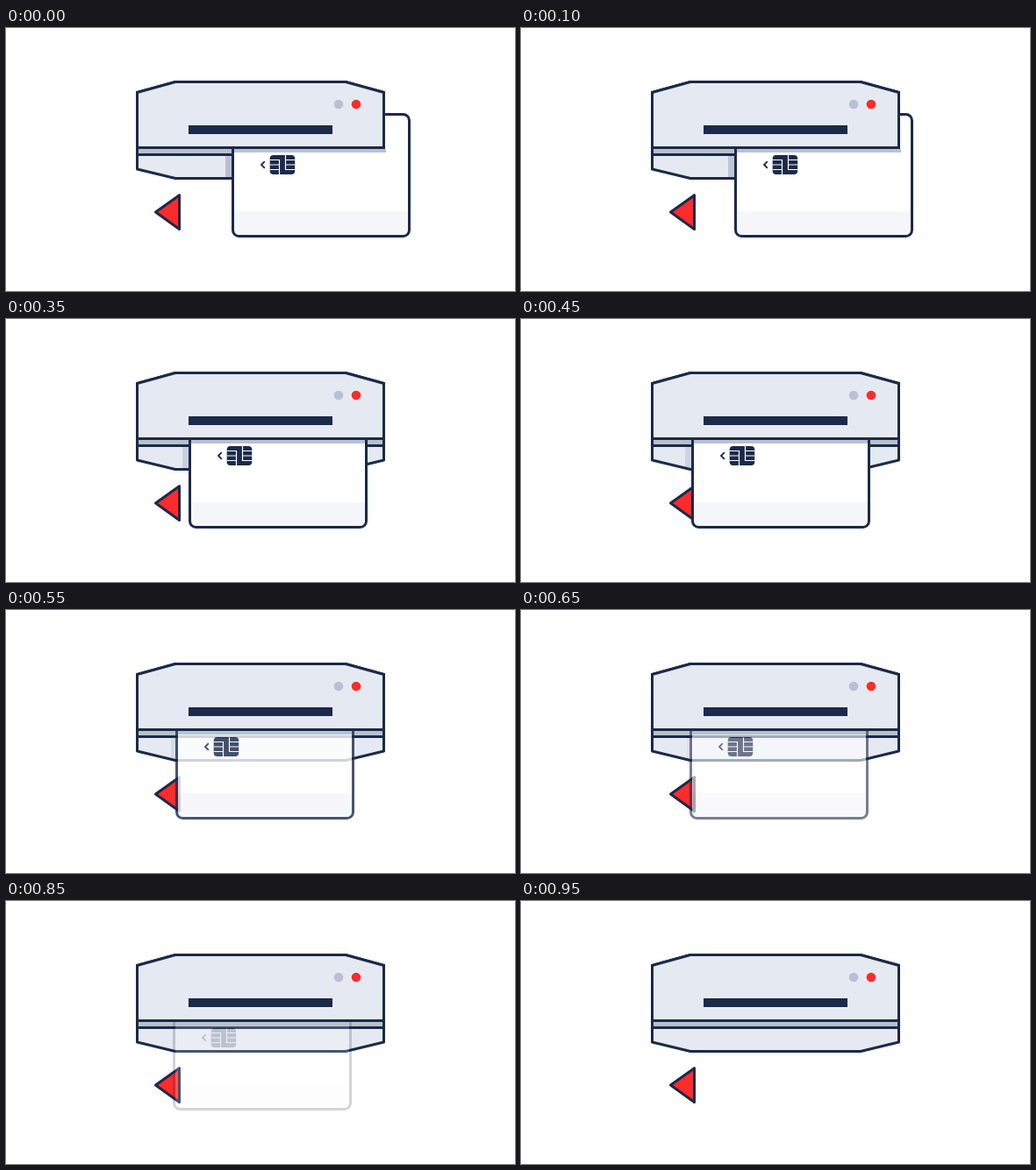
Animation of 580x300 px, one loop 1 s. Source, as an HTML page:

```html
<!DOCTYPE html>
<html lang="en">
<head>
<meta charset="utf-8">
<title>Card reader</title>
<style>
  html, body { margin: 0; width: 100%; height: 100%; overflow: hidden; background: #fff; }
  svg { display: block; width: 580px; height: 300px; }
  .line { stroke: #1b2a49; stroke-width: 3; stroke-linejoin: round; }
  .body { fill: #e5e9f2; }
  .none { fill: none; }
  .navy { fill: #1b2a49; }
  .red { fill: #fd2b2c; }
  .shade { fill: #b9c0d3; }
</style>
</head>
<body>
<svg viewBox="0 0 580 300">
  <defs>
    <path id="shell" d="M149.5 73.5 193 61.5H387L430.5 73.5V161L387 171.5H193L149.5 161Z"/>
    <clipPath id="inShell"><use href="#shell"/></clipPath>
    <clipPath id="underSlot"><rect x="148" y="138" width="285" height="4"/></clipPath>
  </defs>

  <!-- lower housing -->
  <use href="#shell" class="body"/>
  <g clip-path="url(#inShell)">
    <rect id="side" class="shade" x="-7" y="146" width="7" height="26"/>
  </g>
  <rect x="149.5" y="138" width="281" height="5" fill="#b8c0c9"/>
  <path class="line" d="M149.5 144.5H430.5"/>
  <use href="#shell" class="line none"/>
  <path class="line red" d="M170.5 210 197.5 190.7V229.5Z"/>

  <!-- card, drawn at its resting place -->
  <g id="card">
    <g class="move">
      <rect x="195.5" y="98.5" width="201" height="139" rx="7" fill="#fff"/>
      <path d="M195.5 209H396.5V230.5A7 7 0 0 1 389.5 237.5H202.5A7 7 0 0 1 195.5 230.5Z" fill="#f5f6fa"/>
      <path d="M231.8 152.2 228 156 231.8 159.8" fill="none" stroke="#1b2a49" stroke-width="1.8"/>
      <rect class="navy" x="237.7" y="145" width="28.5" height="22" rx="4"/>
      <path d="M237.7 150.5H248.5V167M237.7 156H248.5M237.7 161.5H248.5M255.5 145V161.5H266.2M255.5 156H266.2M255.5 150.5H266.2"
            fill="none" stroke="#fff" stroke-width="1.2"/>
    </g>
    <g clip-path="url(#underSlot)">
      <rect class="move shade" x="195.5" y="138" width="201" height="4"/>
    </g>
    <rect class="move line none" x="195.5" y="98.5" width="201" height="139" rx="7"/>
  </g>

  <!-- upper housing -->
  <path class="line body" style="stroke-linejoin: miter" d="M149.5 73.5 193 61.5H387L430.5 73.5V136.5H149.5Z"/>
  <rect class="navy" x="208" y="111" width="164" height="10"/>
  <circle class="shade" cx="379" cy="87" r="5.3"/>
  <circle class="red" cx="399" cy="87" r="5.3"/>
</svg>
<script>
  const LOOP = { duration: 1000, iterations: Infinity };
  const STEP = 0.05;

  // Rows of [offset, value]; each stretch advances in 50 ms steps.
  function run(el, prop, rows) {
    const frames = rows.map(([offset, value], i) => {
      const next = rows[i + 1];
      const n = next ? Math.round((next[0] - offset) / STEP) : 1;
      return { offset, [prop]: value, easing: `steps(${n}, end)` };
    });
    el.animate(frames, LOOP);
  }

  const slide = x => `translateX(${x}px)`;
  const side = (x, w) => `translateX(${x}px) scaleX(${w})`;

  for (const el of document.querySelectorAll('.move')) {
    run(el, 'transform', [[0, slide(63)], [0.45, slide(0)], [0.95, slide(-5)], [1, slide(-5)]]);
  }

  run(document.getElementById('card'), 'opacity', [[0, 1], [0.45, 1], [0.95, 0], [1, 0]]);

  const shade = document.getElementById('side');
  run(shade, 'transform', [[0, side(257, 1)], [0.45, side(194, 1)], [0.8, side(190.5, 0)], [1, side(190.5, 0)]]);
  run(shade, 'opacity', [[0, 1], [0.45, 0.5], [0.8, 0], [1, 0]]);
</script>
</body>
</html>
```
